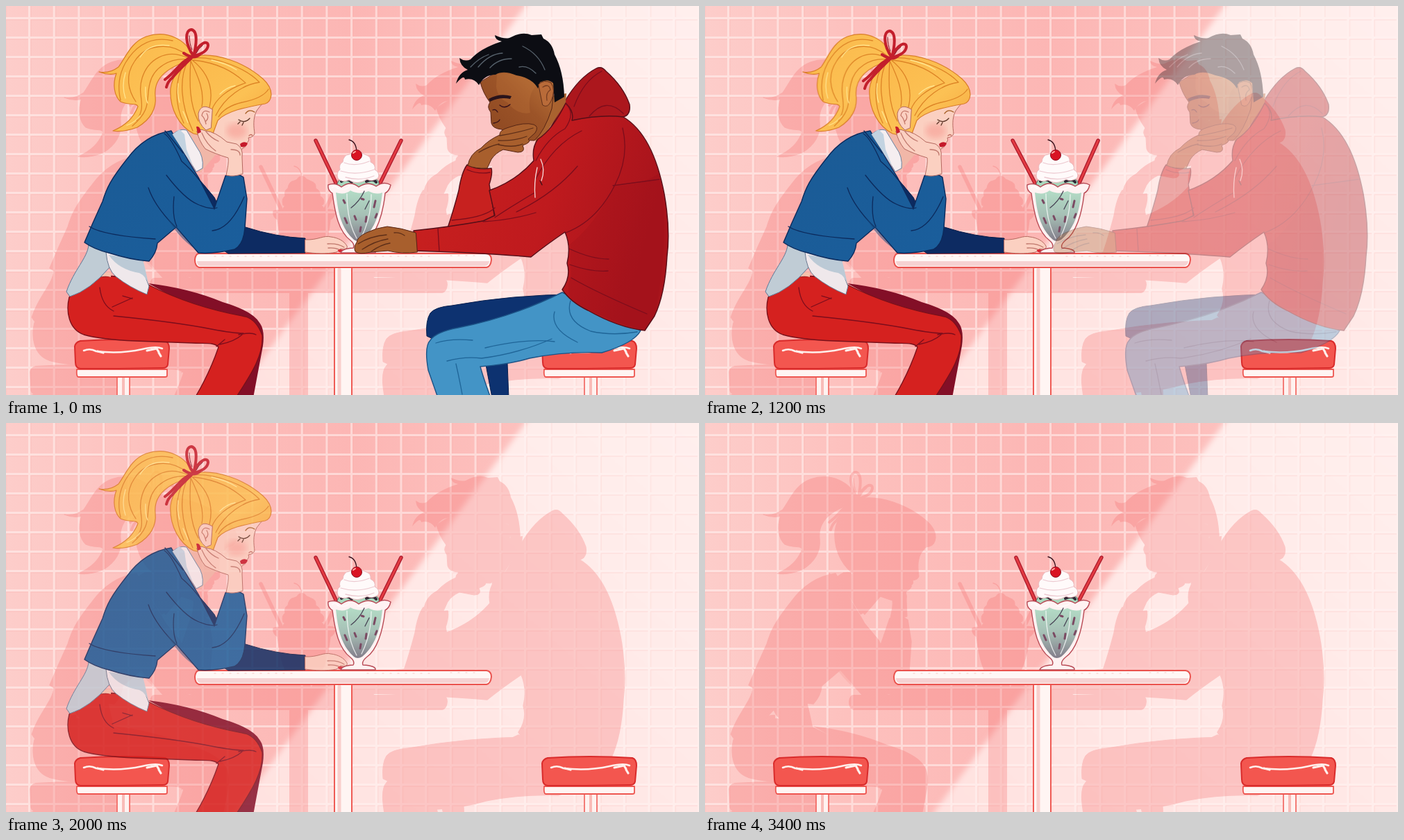
An HTML page that plays this animation: 998 px wide and 561 px high, repeating every 3600 ms.

```html
<!DOCTYPE html>
<html lang="en">
<head>
<meta charset="utf-8">
<title>Milkshake for two</title>
<style>
  html, body { margin: 0; width: 100%; height: 100%; overflow: hidden; background: #fdc4c1; }
  svg { display: block; width: 100vw; height: 100vh; }
  path { stroke-linejoin: round; stroke-linecap: round; }
  .line { fill: none; stroke-width: 1.3; }
  .navy { stroke: #0c2a5c; }
  .wine { stroke: #7c0d1c; }
  .ink { stroke: #35101a; }
  .denim { stroke: #1f6598; }
  .gold { stroke: #dd8426; }
  .shine { stroke: #ffe58f; }
  .skin { fill: #fbd0c1; stroke: #b4685f; stroke-width: 1; }
  .tan { fill: #a85f2d; stroke: #552414; stroke-width: 1; }
</style>
</head>
<body>
<svg viewBox="0 0 998 561" preserveAspectRatio="none">
  <defs>
    <linearGradient id="wall">
      <stop offset="0" stop-color="#fdcdca"/>
      <stop offset=".22" stop-color="#fdc0bd"/>
      <stop offset=".5" stop-color="#fcb6b4"/>
      <stop offset=".8" stop-color="#fdc3c0"/>
    </linearGradient>
    <linearGradient id="sun" x1="0" y1="1" x2="1" y2="0">
      <stop offset="0" stop-color="#ffe1df"/>
      <stop offset="1" stop-color="#fff0ee"/>
    </linearGradient>
    <linearGradient id="hair" x1="0" y1="0" x2="1" y2="1">
      <stop offset="0" stop-color="#fbb84a"/>
      <stop offset=".6" stop-color="#fcc154"/>
      <stop offset="1" stop-color="#f5a73f"/>
    </linearGradient>
    <linearGradient id="knit" x1="0" y1="0" x2="1" y2="1">
      <stop offset="0" stop-color="#1b5b95"/>
      <stop offset="1" stop-color="#1a5e9c"/>
    </linearGradient>
    <linearGradient id="hoodie" x1="0" y1="0" x2="1" y2=".25">
      <stop offset="0" stop-color="#c9211f"/>
      <stop offset=".6" stop-color="#bf1a1e"/>
      <stop offset="1" stop-color="#a8141c"/>
    </linearGradient>
    <linearGradient id="face" x1="0" y1="1" x2="1" y2="0">
      <stop offset="0" stop-color="#8a4520"/>
      <stop offset=".55" stop-color="#9c5428"/>
      <stop offset="1" stop-color="#c17a3d"/>
    </linearGradient>
    <linearGradient id="mint" x1="0" y1="0" x2="0" y2="1">
      <stop offset="0" stop-color="#b3dcc6"/>
      <stop offset=".5" stop-color="#a6bfb5"/>
      <stop offset="1" stop-color="#827c89"/>
    </linearGradient>
    <pattern id="tiles" x="32" y="16" width="35.7" height="28" patternUnits="userSpaceOnUse">
      <path d="M1.5 0V28M0 1.5H35.7" stroke="#fff3f1" stroke-width="3" opacity=".55"/>
      <path d="M4 4V28M4 4H35.7" stroke="#f59a98" stroke-width="1" fill="none" opacity=".22"/>
    </pattern>
    <filter id="soft" x="-10%" y="-10%" width="120%" height="120%"><feGaussianBlur stdDeviation="4"/></filter>
    <filter id="flat" filterUnits="userSpaceOnUse" x="0" y="0" width="998" height="561">
      <feFlood flood-color="#f4706f" flood-opacity="1"/>
      <feComposite in2="SourceAlpha" operator="in"/>
    </filter>
    <g id="stool">
      <path d="M160 533V565H178V533Z" fill="#fff2f0" stroke="#f0605a" stroke-width="1.6"/>
      <path d="M169 536V561" stroke="#f9bcb8" stroke-width="4"/>
      <path d="M102 524H232V533Q232 535 229 535H104Q101 534 102 524Z" fill="#fff4f2" stroke="#ee5650" stroke-width="1.8"/>
      <path d="M107 483Q168 479 229 483Q235 485 235 494L233 517Q232 522 226 522L162 523L107 523Q100 522 100 514L99 491Q100 485 107 483Z" fill="#f3564f" stroke="#d92b2b" stroke-width="2"/>
      <path d="M112 497Q121 493 130 498Q165 502 196 495Q217 490 225 494" fill="none" stroke="#fff0ec" stroke-width="2.6"/>
      <path d="M132 498L140 500M203 497L217 494L220 499M220 500L223 505" fill="none" stroke="#fff0ec" stroke-width="3.2"/>
    </g>
  </defs>

  <rect width="998" height="561" fill="url(#wall)"/>
  <path d="M748 0L330 561L330 600H1040V-30H770Z" fill="url(#sun)" filter="url(#soft)"/>
  <rect width="998" height="561" fill="url(#tiles)"/>

  <g opacity=".3"><g filter="url(#flat)">
    <g transform="translate(-50 37)">
      <use href="#tailArt"/><use href="#girlArt"/><use href="#bowArt"/>
    </g>
    <use href="#manArt" transform="translate(-63 37)"/>
    <use href="#tableArt" transform="translate(-64 36)"/>
    <use href="#stool" transform="translate(-64 37)"/>
    <use href="#strawArt" transform="translate(-79 38)"/>
    <use href="#shakeArt" transform="translate(-79 38)"/>
  </g></g>

  <use href="#stool"/>
  <use href="#stool" transform="translate(673 0)"/>

  <g id="tableArt">
    <path d="M473 376V570H498V376Z" fill="#fff5f3" stroke="#ef5b55" stroke-width="2"/>
    <path d="M480 380V561" stroke="#f9cfcc" stroke-width="5"/>
    <path d="M278 357H692Q699 358 699 366Q698 376 692 377H278Q272 375 272 366Q273 357 278 357Z" fill="#fff7f5" stroke="#ea524d" stroke-width="2"/>
    <path d="M275 368H696Q695 374 690 375H280Q275 374 275 368Z" fill="#f6d2d2"/>
    <path d="M300 361H420M520 361H610M640 360H680" stroke="#f8c9c6" stroke-width="1.2" stroke-dasharray="2 9"/>
  </g>

  <g id="girl">
    <g id="tail"><g id="tailArt">
      <path d="M270 74C260 48 232 34 202 44C180 52 173 73 162 88C154 94 144 97 134 95C144 99 154 99 159 97C153 113 156 130 165 138C178 144 188 139 190 145C184 161 171 173 154 180C168 182 181 178 189 175C208 164 217 148 215 130C213 111 223 91 264 79Z" fill="url(#hair)" stroke="#d97d28" stroke-width="1.2"/>
      <path class="line gold" d="M262 72C236 50 200 56 185 80C171 100 176 122 187 138M262 75C230 60 204 78 196 104C188 130 204 143 188 165M263 77C236 74 212 89 207 112C201 135 211 148 182 173M240 50C209 43 187 57 172 82C163 98 160 115 165 136"/>
      <path class="line shine" stroke-width="2" d="M235 57Q206 53 193 74M172 96Q166 116 172 133M201 117Q200 132 204 140M174 172Q186 168 193 158"/>
    </g></g>
    <g id="girlArt">
      <path d="M267 238L285 258L300 276L312 300L345 319Q388 333 431 335L431 356L320 357L280 330Z" fill="#0d2b62" stroke="#081b46"/>
      <path class="skin" d="M431 337C449 338 458 330 468 333C478 334 487 339 491 346C493 351 486 351 482 350L476 355C461 358 445 357 431 355Z"/>
      <path class="line" stroke="#bf766b" d="M463 343Q478 342 487 348M464 349Q474 348 481 352"/>
      <ellipse cx="482" cy="353" rx="4" ry="2" fill="#d52530"/>

      <path d="M205 400Q264 407 312 427Q356 440 366 458Q373 468 370 490L356 565H318L330 500L292 448Z" fill="#830f27"/>
      <path d="M118 394Q160 382 205 402C250 425 300 440 345 448Q361 453 369 475C371 506 350 535 331 565H272Q293 530 306 492C301 485 288 487 268 486L186 483Q137 481 112 474C90 466 86 440 91 420Z" fill="#d5211f" stroke="#78101a" stroke-width="1.3"/>
      <path class="line wine" d="M135 406Q138 432 155 440M168 418L182 422M153 434L182 421M155 447Q246 456 296 466Q328 472 342 472M308 488Q329 484 340 474M315 481L303 491M335 474Q353 470 360 474"/>
      <path d="M132 392Q142 382 151 384L151 391Q142 388 132 392Z" fill="#f6c0ac"/>
      <path d="M119 345C117 364 98 380 87 412L92 419Q121 410 149 377L144 352Z" fill="#c0ccd5" stroke="#5d7795"/>
      <path d="M144 355Q146 380 158 390Q178 406 203 416L206 404Q196 382 197 365Z" fill="#efe8eb" stroke="#67778e"/>
      <path d="M148 359Q162 380 192 385Q201 389 205 401Q201 380 197 366Z" fill="#bccad6"/>

      <path d="M262 180L272 179L310 205L280 240L263 221Z" fill="#f1b7a8"/>
      <path d="M238 180C211 184 190 199 174 221C151 250 145 262 139 282Q126 310 113 341Q127 351 148 356Q179 366 206 368Q217 356 218 342L245 319L277 356Q298 358 329 351Q342 344 344 320L347 278L342 247Q330 238 316 245L300 292L277 247L262 222Z" fill="url(#knit)" stroke="#0c2a5c" stroke-width="1.4"/>
      <path d="M240 185Q250 176 260 179L275 204Q285 217 283 234L274 239L268 229L259 214Z" fill="#f5eef0" stroke="#6b83a0"/>
      <path d="M240 185L250 178L257 185L260 207L270 232L258 214Z" fill="#c3d3e1"/>
      <path class="line navy" d="M228 184Q238 190 253 224Q266 235 276 248L300 277L300 293M205 262Q214 289 244 319M231 244Q257 278 276 286Q294 294 304 291M229 180Q240 193 255 212M120 318Q140 331 215 336M297 324Q323 322 343 275M242 275Q239 303 246 318"/>
      <path d="M246 319Q267 349 280 355Q252 340 231 304Z" fill="#154a80" opacity=".5"/>

      <path class="skin" d="M296 140L372 138Q365 145 361 151C355 163 357 175 358 184Q357 189 349 190Q351 195 346 198Q347 203 341 205Q337 212 326 211L293 198L280 170Z"/>
      <ellipse cx="332" cy="180" rx="15" ry="11" fill="#f58b83" opacity=".45" filter="url(#soft)"/>
      <path d="M337 199Q343 194 348 198Q346 205 338 203Z" fill="#c5192b"/>
      <path class="line" stroke="#5a3426" stroke-width="1.5" d="M335 164Q344 170 351 162M337 167L334 170M342 168L340 172"/>
      <path class="line" stroke="#a45d23" stroke-width="2.2" d="M345 155Q350 148 358 153"/>
      <path class="line" stroke="#c0695f" d="M350 187Q353 184 355 187"/>

      <path d="M268 73C300 65 343 81 370 105Q382 116 382 128Q381 139 373 141C346 146 318 151 305 165L298 184Q282 188 270 184C250 174 235 148 237 119Q241 92 268 73Z" fill="url(#hair)" stroke="#d97d28" stroke-width="1.2"/>
      <path class="line gold" d="M268 75C304 72 347 91 365 110C342 113 315 131 302 158M270 78C305 82 327 94 345 111C318 120 301 135 296 151M267 77C289 94 300 117 293 146M265 77C278 104 286 124 282 145M262 79C249 104 251 142 269 180M257 82C243 105 242 141 256 169M266 78C264 111 264 142 277 166M378 120Q370 133 340 139Q315 145 306 160"/>
      <path class="line shine" stroke-width="2" d="M296 78Q318 83 332 92M248 112Q246 127 250 139M255 152L262 168M308 127Q318 117 330 115"/>
      <path class="skin" d="M297 149Q281 139 277 155Q276 169 288 179L295 176Z"/>
      <path class="line" stroke="#c5786a" d="M293 153Q284 148 282 158Q286 161 288 170M289 155Q293 161 288 166"/>
      <path class="skin" d="M275 181Q279 176 287 180Q301 181 318 196L332 199Q342 205 340 218L341 242Q328 247 317 244Q321 227 320 219Q300 213 287 206Q278 195 275 181Z"/>
      <path class="line" stroke="#c0796e" d="M282 183Q289 200 302 209M288 181Q296 191 306 195M324 207Q337 207 337 215"/>
      <path d="M274 174Q279 172 281 182L276 184Z" fill="#c71c2c"/>
    </g>
    <g id="bow"><g id="bowArt" fill="none" stroke="#c31f2c" stroke-width="4">
      <path d="M270 72C258 55 257 35 267 34C277 36 274 57 270 72C278 52 291 49 291 57C290 66 279 70 270 72C249 81 248 92 229 106M269 73Q248 93 239 104Q233 109 231 117M256 68Q270 78 279 70"/>
      <path d="M264 43Q264 54 268 63M283 57Q277 61 274 68" stroke="#7c1020" stroke-width="1"/>
    </g></g>
  </g>

  <g id="straws"><g id="strawArt">
    <path d="M446 194L475 255M569 194L539 255" stroke="#a7172a" stroke-width="5.4"/>
    <path d="M446 194L475 255M569 194L539 255" stroke="#e23a41" stroke-width="3"/>
  </g></g>
  <g id="shakeArt">
    <path d="M477 261Q476 248 489 249Q506 243 528 249Q539 248 537 262Z" fill="#a9d8bd" stroke="#5c756f"/>
    <path d="M483 253Q490 247 498 254M519 253Q529 248 533 254" stroke="#302734" stroke-width="4" fill="none"/>
    <path d="M478 249Q475 240 481 236Q479 228 485 225Q486 215 494 214Q506 207 519 215Q526 217 525 225Q533 229 531 236Q539 240 536 248Q527 254 520 250Q505 259 494 251Q484 255 478 249Z" fill="#fffafa" stroke="#e9b9bd"/>
    <path class="line" stroke="#ecc9d0" d="M487 226Q503 232 523 224M482 238Q505 245 530 236M489 247Q511 253 530 245"/>
    <path class="line ink" d="M505 210Q504 195 494 193"/>
    <circle cx="505" cy="215" r="7.5" fill="#d91423" stroke="#8f1020"/>
    <path d="M500 212L503 210" stroke="#ffb2aa" stroke-width="2"/>
    <path d="M464 258Q474 254 483 261Q496 251 508 261Q521 252 533 260Q544 252 554 258Q552 267 546 270C543 300 534 328 519 338Q512 344 514 349Q533 350 532 356H482Q484 350 500 349Q503 344 496 338C479 325 474 300 470 270Q463 266 464 258Z" fill="#fff2f2" stroke="#b74954" stroke-width="1.4"/>
    <path d="M475 269Q488 273 496 266Q509 273 522 267Q534 273 542 269C539 300 530 323 513 337Q506 341 501 337C482 320 478 297 475 269Z" fill="url(#mint)"/>
    <path class="line" stroke="#fff" stroke-width="3" opacity=".75" d="M491 271Q491 310 505 335M526 272Q526 305 512 333M477 263Q491 267 495 259M506 264Q519 266 527 259M470 262Q473 258 479 263"/>
    <path class="line" stroke="#474254" stroke-width="2" d="M497 291Q509 282 516 267M517 293L523 281"/>
    <path d="M486 280L488 284M512 278L515 279M532 281L530 290M502 303L504 308M519 304L518 311M488 306L491 313M511 319L510 325M534 300L532 305" stroke="#7b4a63" stroke-width="3"/>
  </g>

  <g id="man"><g id="manArt">
    <path d="M820 416Q731 416 642 432Q618 434 611 443Q604 454 606 476L640 492L690 512L700 565H724L722 515L805 460Z" fill="#0d3270" stroke="#081f4d"/>
    <path d="M801 413L838 430L914 468Q905 486 858 500Q805 498 754 508Q724 517 683 520Q688 538 698 565H622L608 525Q602 491 611 482Q619 470 651 464C706 453 755 436 801 413Z" fill="#4394c6" stroke="#1b5285" stroke-width="1.4"/>
    <path class="line denim" d="M813 425Q804 454 842 469Q873 476 909 470M619 486Q640 479 672 482M635 512Q660 505 685 508Q739 501 786 480M648 516Q653 538 657 560M690 493Q748 479 790 484M790 441Q783 466 823 485"/>

    <path d="M805 137Q825 103 850 90Q858 86 864 94Q889 116 898 142Q900 157 889 160Q844 163 825 181L770 202Z" fill="#ac171d" stroke="#560e18" stroke-width="1.4"/>
    <path d="M783 130L807 126L806 140L778 183L763 197L760 175Z" fill="#a9622f"/>
    <path d="M664 229Q680 237 699 234Q701 242 696 257L704 307L636 320Q645 293 652 266Q656 240 664 229Z" fill="#c7211f" stroke="#560e18" stroke-width="1.4"/>
    <path d="M696 266Q735 252 760 223Q757 204 766 192Q787 179 806 140Q819 153 815 165Q858 156 889 160C919 178 938 218 948 271Q957 322 952 361Q949 416 934 447L920 468Q882 464 838 439Q813 427 801 409Q814 390 808 371Q814 347 805 326C783 341 766 354 756 362Q688 356 590 353L587 324Q637 319 687 310L704 302Z" fill="url(#hoodie)" stroke="#560e18" stroke-width="1.4"/>
    <path d="M812 344Q850 314 876 258Q906 262 940 242Q958 326 934 447L920 467Q871 457 816 425Q805 409 814 389Z" fill="#8e101a" opacity=".18"/>
    <path class="line wine" d="M806 141Q821 154 805 177Q780 190 763 223M829 180Q788 200 763 249M818 145Q832 107 858 94M840 159Q864 130 889 155M888 176Q898 217 877 258Q851 310 806 327M874 259L941 250M760 270Q726 290 704 305M735 297Q790 270 823 231M811 350Q843 365 868 365M812 373Q843 384 867 382M814 392Q850 413 923 444M622 321L624 354M664 236Q680 243 697 240M704 291Q690 305 642 309M687 311Q726 309 763 298"/>
    <path class="line" stroke="#f7dcdc" stroke-width="2" d="M770 221Q777 236 771 252M765 233Q760 255 762 276"/>
    <path class="line ink" d="M769 252L772 258"/>

    <path d="M683 110Q687 126 697 139Q692 146 698 153L699 169Q701 177 714 178L726 193L761 194Q776 180 786 148L790 112L753 91L709 94Z" fill="url(#face)" stroke="#552414"/>
    <path d="M707 97L737 98L766 113Q750 126 755 154Q737 158 722 139Q708 133 706 116Z" fill="#be733a" opacity=".35"/>
    <path class="line ink" stroke-width="1.7" d="M711 143Q718 149 726 142M701 150Q705 148 708 153M702 169Q709 168 711 164"/>
    <path d="M695 134Q711 125 728 130L726 134Q711 131 697 138Z" fill="#28131b"/>
    <path d="M648 112Q652 96 665 92Q654 87 653 75Q661 81 669 77Q683 61 714 51Q704 49 704 42Q717 48 725 46Q743 36 757 42L771 41L774 47Q787 53 790 70Q803 94 804 131L790 139L788 111Q781 104 769 110L766 119Q758 104 735 100Q716 92 705 99Q689 99 681 114Q674 103 661 106Q660 98 648 112Z" fill="#0c0d13"/>
    <path class="line" stroke="#56616b" stroke-width="1" d="M680 88Q696 69 715 68M697 89Q709 76 728 76M744 58Q767 69 776 92M669 88Q681 75 695 70M739 88Q751 85 763 97"/>
    <path d="M767 113Q775 105 785 111Q792 121 785 137Q780 148 773 143Z" fill="#b96b39" stroke="#61301b"/>
    <path class="line" stroke="#763d21" d="M773 117Q782 111 784 121Q777 125 779 136"/>
    <path class="tan" d="M665 230Q668 213 684 205Q695 193 711 186Q710 179 724 175Q747 167 760 171Q768 174 762 183L752 192Q758 196 744 201Q749 211 737 211L716 207Q705 212 699 221L693 234Q676 235 665 230Z"/>
    <path class="line" stroke="#5d2e18" d="M711 187Q732 184 759 176M709 194Q732 195 750 188M709 200Q731 205 744 199M681 211Q696 202 710 199"/>
    <path class="tan" d="M590 327Q569 320 549 318Q533 320 519 327Q506 333 505 341Q500 348 503 354Q508 359 525 355L550 353Q570 358 592 355Z"/>
    <path class="line" stroke="#5d2e18" d="M548 330Q524 332 507 343M550 336Q531 339 513 351M553 342Q540 344 526 354M574 331Q567 326 559 327"/>
  </g></g>

  <g id="snow" fill="#fff" opacity=".75"></g>
</svg>
<script>
const $ = id => document.getElementById(id);
const STEP = 200, STEPS = 18;

// One letter per step; "-" means no flakes.
const tailSteps = "ABCBAABCBCABCBAABC";
const strawSteps = "MMHMLLLMMHMMHMMHMH";
const snowSteps = "--abc--cba--abc---";

const tailScale = { A: "1 1", B: ".95 1", C: ".925 .98" };
const bowShift = { A: "0 0", B: "-1 2", C: "-2 3" };
const strawSkew = { L: 2.7, M: 0, H: -1.8 };
const flakes = {
  a: [[490, 2], [250, 28], [863, 117], [995, 78]],
  b: [[404, 77], [795, 220], [741, 328], [46, 300]],
  c: [[20, 410], [152, 263], [656, 454], [713, 428]]
};

const fade = (step, from) => Math.min(1, Math.max(0, 1 - (step - from) / 6));
const flake = ([x, y]) =>
  `<ellipse rx="6.5" ry="4.5" transform="translate(${x} ${y}) rotate(${x % 2 ? 40 : -30})"/>`;

function pose(step) {
  const tail = tailSteps[step];
  $("man").setAttribute("opacity", fade(step, 2));
  $("girl").setAttribute("opacity", fade(step, 9));
  $("tail").setAttribute("transform", `translate(268 72) scale(${tailScale[tail]}) translate(-268 -72)`);
  $("bow").setAttribute("transform", `translate(${bowShift[tail]})`);
  $("straws").setAttribute("transform",
    `translate(0 255) skewX(${strawSkew[strawSteps[step]]}) translate(0 -255)`);
  $("snow").innerHTML = (flakes[snowSteps[step]] || []).map(flake).join("");
}

const start = performance.now();
let shown = -1;
function tick() {
  const step = Math.floor((performance.now() - start) / STEP) % STEPS;
  if (step !== shown) pose(shown = step);
  requestAnimationFrame(tick);
}
tick();
</script>
</body>
</html>
```
